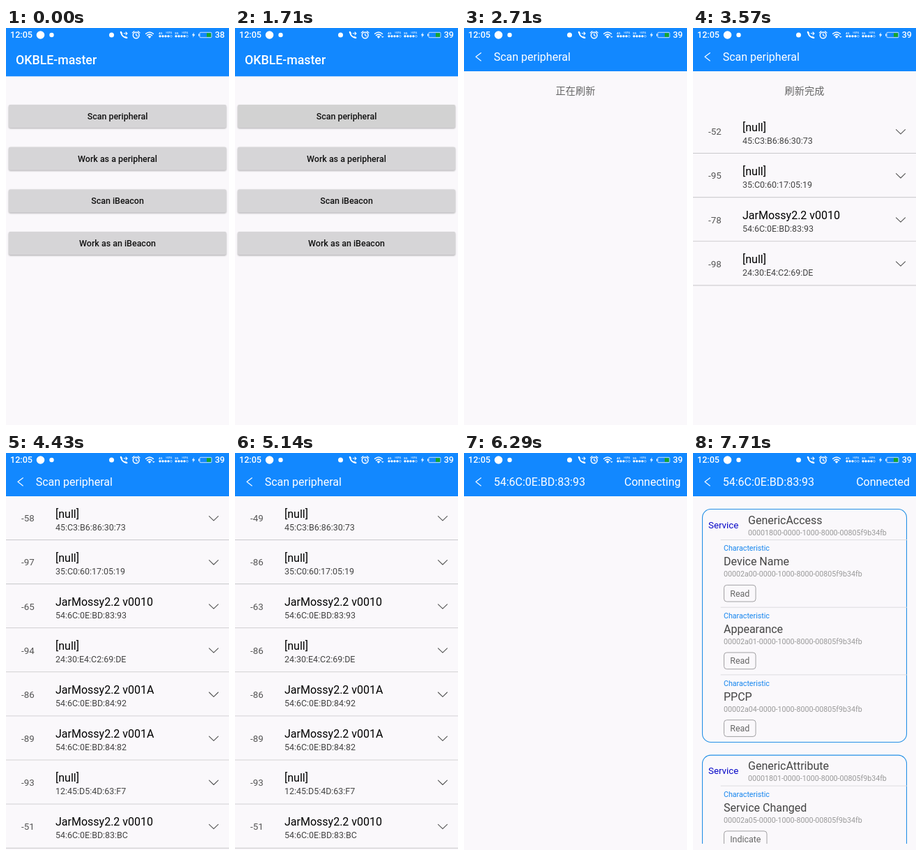
An HTML page for the animation above (8000 ms loop, 320 px wide and 569 px high).

```html
<!DOCTYPE html>
<html lang="en">
<head>
<meta charset="utf-8">
<title>BLE scanner demo</title>
<style>
  html, body { margin: 0; width: 100%; height: 100%; overflow: hidden; background: #faf8fb; }
  svg { display: block; width: 320px; height: 569px; font-family: Roboto, "Noto Sans CJK SC", "Noto Sans CJK", sans-serif; }
  text { white-space: pre; }
  .mid { text-anchor: middle; }
  .end { text-anchor: end; }
  .bold { font-weight: 500; }
  .line { fill: none; stroke-linecap: round; stroke-linejoin: round; }
</style>
</head>
<body>
<svg id="stage" viewBox="0 0 320 569"></svg>
<script>
const LOOP = 8000;
const BLUE = '#1288ff', PAPER = '#faf8fb', GREY = '#d6d5d7';
const HEAD = 62, ROW = 63.1, TAPPED = 2;
const MUG = 'JarMossy2.2 v0010', MUG_A = 'JarMossy2.2 v001A';

// name, address, time of appearance, signal readings
const devices = [
  ['[null]', '45:C3:B6:86:30:73', 2860, -52, -58, -49],
  ['[null]', '35:C0:60:17:05:19', 3000, -95, -97, -86],
  [MUG, '54:6C:0E:BD:83:93', 3430, -78, -65, -63],
  ['[null]', '24:30:E4:C2:69:DE', 3570, -98, -94, -86],
  [MUG_A, '54:6C:0E:BD:84:92', 4140, -86, -86, -83],
  [MUG_A, '54:6C:0E:BD:84:82', 4140, -89, -89, -79],
  ['[null]', '12:45:D5:4D:63:F7', 4140, -93, -93, -89],
  [MUG, '54:6C:0E:BD:83:BC', 4430, -51, -51, -54]
];

// [start, value] steps
const listX = [[0, 320], [1860, 70], [2000, 0]];
const deviceX = [[0, 320], [5570, 122], [5710, 20], [5860, 0]];
const pullY = [[0, 0], [2290, 14], [2430, 38], [2570, 55], [4430, 0]];
const buttonFill = [[0, GREY], [1140, '#d5d4d6'], [1290, '#d4d4d5'], [1430, '#d3d3d4'], [1570, '#d2d2d2']];
const refreshText = [[0, '正在刷新'], [3430, '刷新完成']];
const linkText = [[0, 'Connecting'], [7290, 'Connected']];

const at = (steps, t) => steps.reduce((v, [start, next]) => t >= start ? next : v, steps[0][1]);

const text = (x, y, size, fill, str, more = '') =>
  `<text x="${x}" y="${y}" font-size="${size}" fill="${fill}" ${more}>${str}</text>`;
const rect = (x, y, w, h, fill, more = '') =>
  `<rect x="${x}" y="${y}" width="${w}" height="${h}" fill="${fill}" ${more}/>`;
const line = (d, color, width = 1, more = '') =>
  `<path class="line" d="${d}" stroke="${color}" stroke-width="${width}" ${more}/>`;
const group = (id, body, more = '') => `<g id="${id}" ${more}>${body}</g>`;
const rule = (x1, x2, y, color) => line(`M${x1} ${y}H${x2}`, color, 1, 'stroke-linecap="butt"');

function button(label, i) {
  const y = 110 + i * 60.7;
  return rect(4, y + .9, 312, 33.2, '#000', 'rx="2" opacity=".3" filter="url(#soft)"') +
    rect(4, y, 312, 33, GREY, `rx="2" id="button${i}"`) +
    text(160, y + 21, 12.44, '#111', label, 'class="mid bold"');
}

const home = rect(0, 0, 320, 569, PAPER) + rect(0, 0, 320, 69.3, BLUE) +
  text(14, 51.5, 17.78, '#fff', 'OKBLE-master', 'class="bold"') +
  ['Scan peripheral', 'Work as a peripheral', 'Scan iBeacon', 'Work as an iBeacon'].map(button).join('');

const topBar = title => rect(0, 0, 320, HEAD, BLUE) +
  line('M24.3 35.7L17 41.3L24.3 47', '#fff', 1.1) + text(42.7, 47.2, 16, '#fff', title);

function deviceRow([name, address], i) {
  const y = HEAD + i * ROW;
  return group('row' + i,
    rect(0, y, 320, ROW, i === TAPPED ? '#ebebec' : PAPER, `id="back${i}"`) +
    text(31.3, y + 36.3, 13.33, '#555', '', `class="mid" id="rssi${i}"`) +
    text(71, y + 30.7, 16, '#000', name) +
    text(71, y + 48.7, 12.44, '#444', address) +
    line(`M291.5 ${y + 28.6}l6.5 6.3l6.5 -6.3`, '#555', 1.1) +
    rule(0, 320, y + ROW - .5, '#c6c5c8'));
}

const list = rect(0, 0, 320, 569, PAPER) +
  group('pull', text(160, 40, 14.2, '#666', '', 'class="mid" id="refresh"') +
    devices.map(deviceRow).join('')) +
  topBar('Scan peripheral');

const uuid = short => `0000${short}-0000-1000-8000-00805f9b34fb`;

function trait([name, short, action, width], i, top) {
  const y = top + 44.5 + i * 96.7;
  return rule(40, 306.5, y, '#dddce0') +
    text(44, y + 15.6, 10.67, '#1585ee', 'Characteristic') +
    text(44, y + 36.7, 16, '#444', name) +
    text(44, y + 52.7, 10.67, '#999', uuid(short)) +
    rect(44.5, y + 64.8, width, 23.7, 'none', 'rx="4" stroke="#a2a1a4"') +
    text(44.5 + width / 2, y + 81.1, 12.44, '#666', action, 'class="mid"');
}

function service(top, height, name, short, traits) {
  return rect(13.5, top + .5, 293, height, 'none', 'rx="12" stroke="#2591e6" stroke-width="1.1"') +
    text(22, top + 27.7, 13.33, '#0808c8', 'Service') +
    text(79, top + 21.8, 16, '#444', name) +
    text(79, top + 37.8, 10.67, '#999', uuid(short)) +
    traits.map((item, i) => trait(item, i, top)).join('');
}

const device = rect(0, 0, 320, 569, PAPER) + topBar('54:6C:0E:BD:83:93') +
  text(311, 47.2, 16, '#fff', '', 'class="end" id="link"') +
  group('services',
    service(80, 334, 'GenericAccess', '1800', [
      ['Device Name', '2a00', 'Read', 45.5],
      ['Appearance', '2a01', 'Read', 45.5],
      ['PPCP', '2a04', 'Read', 45.5]]) +
    service(432.6, 160, 'GenericAttribute', '1801', [
      ['Service Changed', '2a05', 'Indicate', 61.5]]),
    'clip-path="url(#body)"');

function signal(x, label, id) {
  const dots = [0, 1, 2, 3, 4].map(i =>
    `<circle cx="${x + 2 + i * 4}" cy="11.8" r="1.4" fill="${i < 4 ? '#fff' : 'none'}"
      stroke="#fff" stroke-width=".5" id="${id}${i}"/>`).join('');
  return text(x, 8.6, 4.4, '#fff', label, 'class="bold"') +
    text(x + 10.5, 7.6, 3.5, '#fff', 'HSPA') + dots;
}

const status =
  text(6, 14.4, 12.6, '#fff', '12:05', 'class="bold"') +
  '<circle cx="49.5" cy="10" r="5.8" fill="#fff"/>' +
  '<circle cx="65.5" cy="10" r="3.2" fill="#fff"/>' +
  '<circle cx="151.5" cy="10" r="3.5" fill="#fff"/>' +
  // call forwarding
  line('M165.2 6.3Q166 12.6 172.6 13.9', '#fff', 1.7) +
  line('M164.9 5.9l1 2.2M170.9 13.2l2.3 .7', '#fff', 2.4) +
  line('M169.2 7.8h4.6M172 5.8l2 2l-2 2', '#fff', 1.1) +
  // alarm clock
  '<circle cx="186.7" cy="10.3" r="4.4" fill="none" stroke="#fff" stroke-width="1.5"/>' +
  line('M186.7 8v2.6l1.8 1M181.3 6.9l2.6 -2.2M192.1 6.9l-2.6 -2.2', '#fff', 1.2) +
  // wifi
  line('M200.6 8.3Q206 3.7 211.4 8.3M202.5 10.6Q206 7.7 209.5 10.6', '#fff', 1.5) +
  '<path d="M203.6 12.2Q206 10.4 208.4 12.2L206 14.9Z" fill="#fff"/>' +
  '<path id="traffic" d="M210 12h3.6l-1.8 2Z" fill="#fff"/>' +
  signal(219, '4G', 'a') + signal(242, '3G', 'b') +
  '<path d="M269.8 6.2l-3 4.4h2l-.7 3.2l3.2 -4.5h-2.1Z" fill="#fff"/>' +
  rect(278, 6.3, 17, 7.4, 'none', 'rx="1" stroke="#dcecff" stroke-width=".9"') +
  rect(276, 8.4, 1.6, 3.2, '#dcecff') +
  rect(288, 7.2, 6.2, 5.6, '#16a52b') +
  text(314, 14.4, 12.6, '#fff', '', 'class="end bold" id="level"');

document.getElementById('stage').innerHTML =
  `<defs>
    <filter id="soft" x="-5%" y="-30%" width="110%" height="170%"><feGaussianBlur stdDeviation=".9"/></filter>
    <clipPath id="body"><rect y="62" width="320" height="498"/></clipPath>
  </defs>` +
  home + group('list', list) + group('device', device) + status;

const el = id => document.getElementById(id);
const show = (id, on) => el(id).setAttribute('visibility', on ? 'inherit' : 'hidden');
const move = (id, x, y = 0) => el(id).setAttribute('transform', `translate(${x} ${y})`);
const write = (id, str) => { if (el(id).textContent !== String(str)) el(id).textContent = str; };

function reading([, , , first, second, last], i, t) {
  if (t >= 4570 + Math.min(i, 6) * 143) return last;
  return t >= (i === 3 ? 4140 : 4430) ? second : first;
}

function draw(t) {
  el('button0').setAttribute('fill', at(buttonFill, t));
  move('list', at(listX, t));
  move('device', at(deviceX, t));

  const pull = at(pullY, t);
  move('pull', 0, pull);
  show('refresh', pull > 0);
  write('refresh', at(refreshText, t));
  devices.forEach((d, i) => {
    show('row' + i, t >= d[2]);
    write('rssi' + i, reading(d, i, t));
  });
  show('back' + TAPPED, t >= 5430);

  write('link', at(linkText, t));
  show('services', t >= 7430);

  write('level', t < 140 ? 38 : 39);
  show('traffic', t >= 570 && t < 7290);
  el('a3').setAttribute('fill', t < 6290 ? '#fff' : 'none');
}

const begin = performance.now();
function tick() {
  draw((performance.now() - begin) % LOOP);
  requestAnimationFrame(tick);
}
tick();
</script>
</body>
</html>
```
